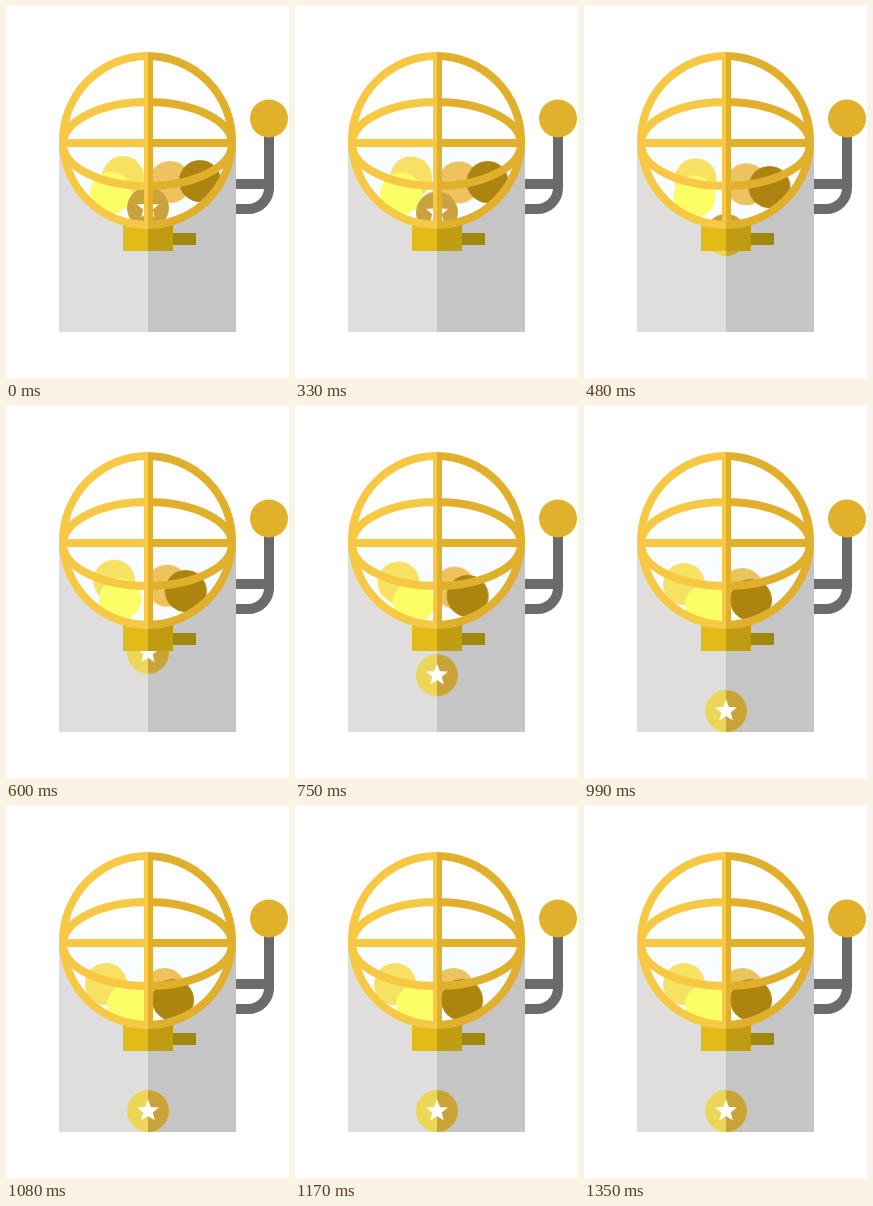
Write an HTML page that moves like this. It is 283x372 px and loops after 1.48 s.

```html
<!DOCTYPE html>
<html lang="en">
<head>
<meta charset="utf-8">
<title>Lottery machine</title>
<style>
  html, body { margin: 0; width: 100%; height: 100%; overflow: hidden; background: #fff; }
  svg { display: block; width: 283px; height: 372px; }
  .cage { fill: none; stroke-width: 8; }
</style>
</head>
<body>
<svg viewBox="0 0 283 372">
  <defs>
    <linearGradient id="gold" gradientUnits="userSpaceOnUse" x1="0" x2="283" y1="0" y2="0">
      <stop offset=".5018" stop-color="#f6c843"/>
      <stop offset=".5018" stop-color="#e0af2b"/>
    </linearGradient>
    <clipPath id="globe"><circle cx="141.5" cy="134.5" r="85"/></clipPath>
    <clipPath id="chute"><rect x="53" y="220" width="177" height="106"/></clipPath>
    <path id="star"/>
  </defs>

  <!-- lever -->
  <path d="M263 120V182A21 21 0 0 1 242 203H228M228 178H263" fill="none" stroke="#6b6b6b" stroke-width="10"/>
  <circle cx="263" cy="112.5" r="19" fill="#e1b12c"/>

  <!-- cabinet -->
  <path d="M53 134H142V326H53Z" fill="#dfdedc"/>
  <path d="M142 134H230V326H142Z" fill="#c5c5c5"/>

  <!-- drawn ball below the globe -->
  <g clip-path="url(#chute)">
    <g class="drawn">
      <circle r="21" fill="#ebd657"/>
      <path d="M0-21A21 21 0 0 1 0 21Z" fill="#c9a238"/>
      <use href="#star" fill="#fff"/>
    </g>
  </g>

  <!-- globe -->
  <circle cx="141.5" cy="134.5" r="86" fill="#fff"/>
  <path d="M57 137H226A85 85 0 0 1 57 137Z" fill="#f9fdff"/>
  <g clip-path="url(#globe)">
    <g id="balls"></g>
    <g class="drawn">
      <circle r="21" fill="#c9a23c"/>
      <use href="#star" fill="#fff"/>
    </g>
  </g>

  <!-- base and spout -->
  <path d="M117 218H142V245H117Z" fill="#e3bb16"/>
  <path d="M142 218H167V245H142Z" fill="#c09c12"/>
  <path d="M167 227H190V239H167Z" fill="#a4860f"/>

  <!-- cage -->
  <g class="cage" stroke="url(#gold)">
    <ellipse cx="141.5" cy="138" rx="84.5" ry="42"/>
    <circle cx="141.5" cy="134.5" r="84.5"/>
  </g>
  <path d="M57 133H226V141H57ZM138 48H147V219H138Z" fill="url(#gold)"/>
</svg>
<script>
  const LOOP = 1480, START = 300, STEP = 30;

  // color, start x, start y, end x, end y
  const balls = [
    ['#f6e163', 117, 171, 100, 178],
    ['#eec25e', 164, 176, 158.5, 183],
    ['#fcfe66', 105, 187, 122, 199],
    ['#ae8410', 194, 175, 167, 194],
  ];

  const at = (x, y) => `translate(${x}px, ${y}px)`;

  function slide(el, x0, y0, x1, y1, steps) {
    const from = at(x0, y0), to = at(x1, y1);
    el.animate([
      { offset: 0, transform: from },
      { offset: START / LOOP, transform: from, easing: `steps(${steps}, end)` },
      { offset: (START + steps * STEP) / LOOP, transform: to },
      { offset: 1, transform: to },
    ], { duration: LOOP, iterations: Infinity });
  }

  function starPath(outer, inner) {
    const points = Array.from({ length: 10 }, (_, i) => {
      const r = i % 2 ? inner : outer, a = (i / 5 - 0.5) * Math.PI;
      return `${r * Math.cos(a)} ${r * Math.sin(a)}`;
    });
    return `M${points.join('L')}Z`;
  }

  document.getElementById('star').setAttribute('d', starPath(11.5, 5));

  for (const [color, ...path] of balls) {
    const ball = document.createElementNS('http://www.w3.org/2000/svg', 'circle');
    ball.setAttribute('r', 21);
    ball.setAttribute('fill', color);
    document.getElementById('balls').append(ball);
    slide(ball, ...path, 19);
  }

  for (const el of document.querySelectorAll('.drawn')) slide(el, 142, 202, 142, 305, 23);
</script>
</body>
</html>
```
